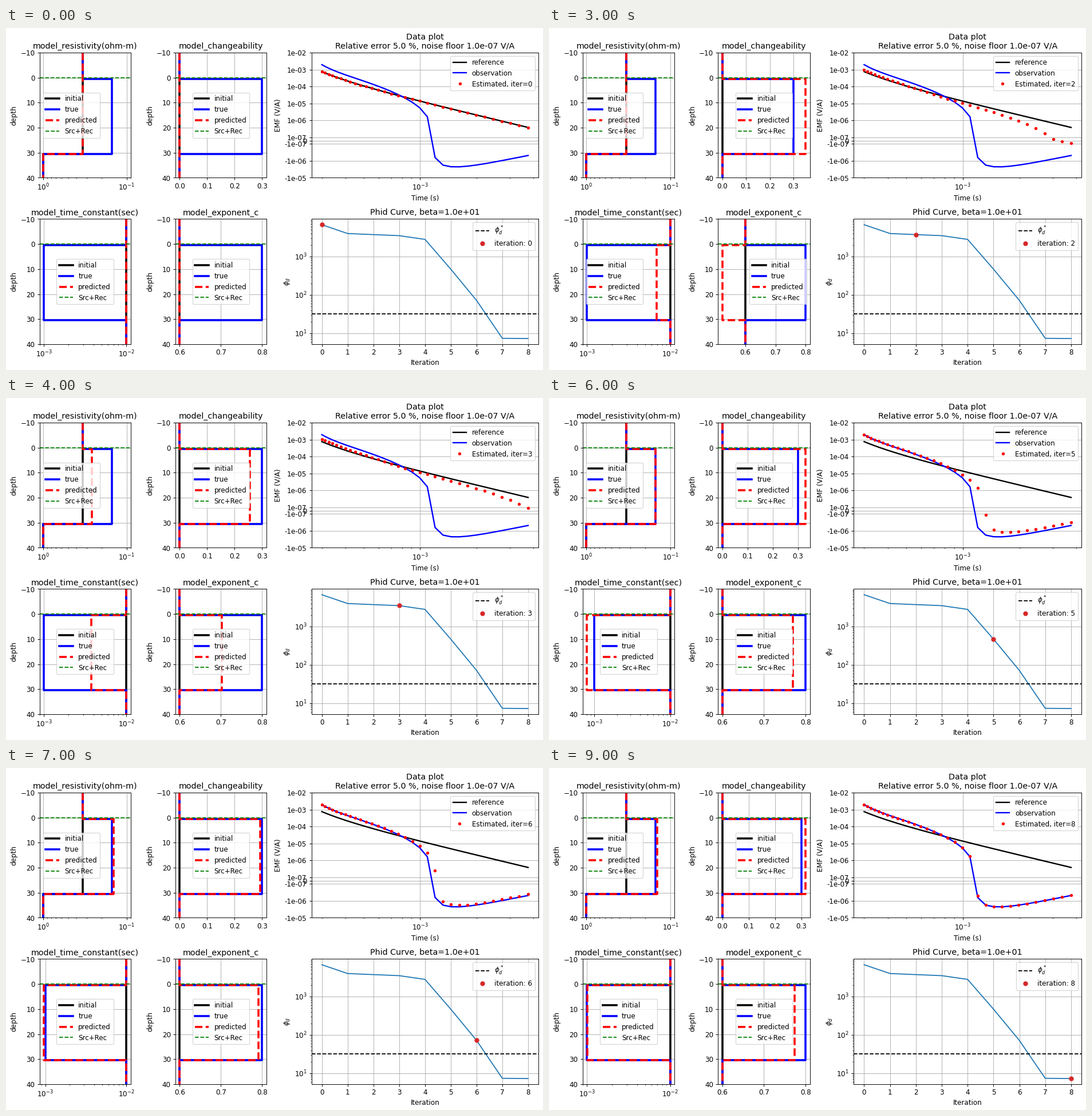
These frames come from a looping animation (938 px wide and 597 px high, 10000 ms). A matplotlib script:

```python
import numpy as np
import matplotlib.pyplot as plt
from matplotlib.animation import FuncAnimation
from matplotlib.ticker import MultipleLocator, NullFormatter

W, H, DPI = 938, 597, 85.27
plt.rcParams["font.family"] = "DejaVu Sans"
fig = plt.figure(figsize=((W + 1e-6) / DPI, (H + 1e-6) / DPI), dpi=DPI)

TOP, BOTTOM = (43, 261.5), (333.5, 552)
TIGHT = [(58.8, 217.5), (296.1, 454.7), (533.7, 930)]
WIDE = [(58.8, 218.9), (295.4, 455.5), (532.4, 930)]

# Predicted layer values at a few iterations, interpolated in between
STEPS = [0, 1, 2, 4, 5, 6, 8]
PREDICTED = {
    "resistivity": [1 / 3, 0.394, 0.334, 0.1885, 0.15, 0.1424, 0.1443],
    "changeability": [0, 0.359, 0.351, 0.1575, 0.33, 0.2937, 0.3157],
    "time": [1e-2, 1e-2, 6.85e-3, 6.78e-4, 8e-4, 9.55e-4, 1.02e-3],
    "exponent": [0.6, 0.6, 0.5235, 0.882, 0.77, 0.791, 0.773],
}
PHID = [6740, 3980, 3730, 3500, 2800, 470, 72, 7.4, 7.3]
PHID_TARGET = 32

k = np.arange(32)
times = 2e-4 + 1e-4 * 10 ** (0.05 * k)


def decay(steps, exponents):
    """Smooth positive decay: a cubic in log space through key points."""
    return 10 ** np.polyval(np.polyfit(steps, exponents, 3), k)


def polarize(emf, amp, power):
    """Subtract the polarization response, which turns late times negative."""
    return emf - amp * (times / times[-1]) ** -power


reference = decay([0, 6, 12, 18, 24, 31],
                  [-3.12, -3.64, -4.21, -4.85, -5.57, -6.42])
conductive = decay([0, 8, 16, 20], [-2.684, -3.444, -4.47, -5.28])
observed = polarize(conductive, 4.8e-7, 2.2)


def lifted(gain):
    return reference * 10 ** (gain * np.clip(1 - (k / 16) ** 2, 0, 1))


dip = 10 ** (-0.4 * np.exp(-((k - 24.5) / 4.5) ** 2 / 2))
estimates = [
    reference,
    *(polarize(lifted(g), a, 1.5)
      for g, a in [(0.06, 4.7e-7), (0.10, 4.5e-7), (0.15, 3e-7)]),
    lifted(0.22) * dip,
    *(polarize(conductive, 4.8e-7 * s, 2.2) for s in (0.65, 0.85, 0.98, 0.98)),
]


def panel(col, row):
    (x0, x1), (y0, y1) = col, row
    ax = fig.add_axes([x0 / W, 1 - y1 / H, (x1 - x0) / W, (y1 - y0) / H])
    ax.grid(True)
    return ax


def log_x(ax):
    ax.set_xscale("log")
    ax.xaxis.set_minor_formatter(NullFormatter())


def model(ax, name, top, layers, bottom, log=False):
    """Plot the initial, true and predicted three-layer profiles."""
    if log:
        log_x(ax)
    else:
        ax.xaxis.set_major_locator(MultipleLocator(0.1))
    styles = [("k-", "initial"), ("b-", "true"), ("r--", "predicted")]
    for value, (fmt, label) in zip(layers, styles):
        ax.plot([top, top, value, value, bottom, bottom],
                [-10, 0.5, 0.5, 30.5, 30.5, 40], fmt, lw=3, label=label)
    ax.axhline(0, color="g", ls="--", lw=1.5, label="Src+Rec")
    ax.set_ylim(40, -10)
    ax.yaxis.set_major_locator(MultipleLocator(10))
    ax.set_title("model_" + name)
    ax.set_ylabel("depth")
    ax.legend(loc="best")


def data_plot(ax, it):
    log_x(ax)
    ax.set_yscale("symlog", linthresh=1e-7, linscale=0.18)
    ax.plot(times, reference, "k-", lw=2, label="reference")
    ax.plot(times, observed, "b-", lw=2, label="observation")
    ax.plot(times, estimates[it], "r.", ms=7, label=f"Estimated, iter={it}")
    ticks = [10.0 ** -n for n in range(2, 8)] + [0]
    ticks += [-10.0 ** -n for n in (7, 6, 5)]
    ax.set_yticks(ticks, [f"{v:.0e}" if v else "0" for v in ticks])
    ax.yaxis.minorticks_off()
    ax.set_ylim(-1e-5, 1e-2)
    ax.set_title("Data plot\nRelative error 5.0 %, noise floor 1.0e-07 V/A")
    ax.set_xlabel("Time (s)")
    ax.set_ylabel("EMF (V/A)")
    ax.legend(loc="upper right")


def phid_plot(ax, it):
    ax.set_yscale("log")
    ax.plot(PHID)
    ax.axhline(PHID_TARGET, color="k", ls="--", label=r"$\phi_d^*$")
    ax.plot(it, PHID[it], "o", color="tab:red", label=f"iteration: {it}")
    ax.xaxis.set_major_locator(MultipleLocator(1))
    ax.set_title("Phid Curve, beta=1.0e+01")
    ax.set_xlabel("Iteration")
    ax.set_ylabel(r"$\phi_d$")
    ax.legend(loc="upper right")


def update(i):
    it = max(0, i - 1)  # the starting model is held twice as long
    now = {name: np.interp(it, STEPS, v) for name, v in PREDICTED.items()}
    fig.clear()
    c1, c2, c3 = WIDE if now["changeability"] > 0.3 else TIGHT
    ax = panel(c1, TOP)
    model(ax, "resistivity(ohm-m)", 1 / 3,
          (1 / 3, 0.15, now["resistivity"]), 1, log=True)
    ax.set_xlim(1.1, 0.09)
    model(panel(c2, TOP), "changeability", 0,
          (0, 0.3, now["changeability"]), 0)
    model(panel(c1, BOTTOM), "time_constant(sec)", 1e-2,
          (1e-2, 1e-3, now["time"]), 1e-2, log=True)
    model(panel(c2, BOTTOM), "exponent_c", 0.6,
          (0.6, 0.8, now["exponent"]), 0.6)
    data_plot(panel(c3, TOP), it)
    phid_plot(panel(c3, BOTTOM), it)
    return []


anim = FuncAnimation(fig, update, frames=10, interval=1000, repeat=True)
plt.show()
```
